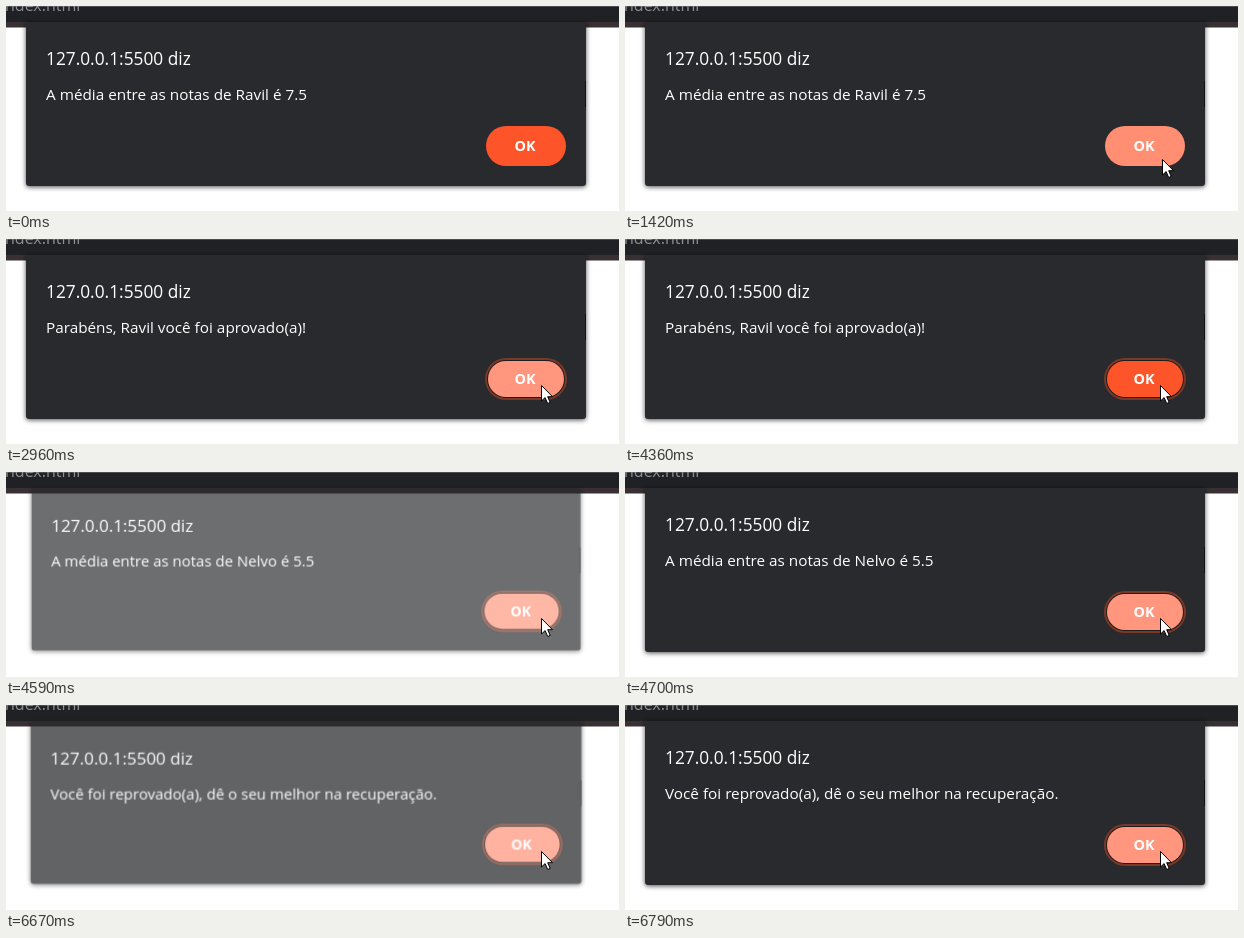
Animation of 613x205 px, one loop 8000 ms. Source, as an HTML page:

```html
<!DOCTYPE html>
<html lang="pt-BR">
<head>
<meta charset="utf-8">
<title>Média das notas</title>
<style>
  html, body { margin: 0; width: 100%; height: 100%; overflow: hidden; background: #fff; }
  svg { display: block; width: 613px; height: 205px; font-family: "Open Sans", "Noto Sans", sans-serif; }

  .panel { fill: #292a2d; filter: drop-shadow(0 1px 2.5px rgba(0, 0, 0, .7)); }
  text { fill: #fff; font-weight: 500; }
  .title { font-size: 17.3px; }
  .msg { font-size: 15.3px; opacity: 0; }
  .ok { font-size: 14.4px; font-weight: 700; text-anchor: middle; }
  .tab { font-size: 16px; font-weight: 400; fill: #8e9094; }

  .dialog { transform-origin: 300px 98px; animation: dialog 8s linear infinite; }
  .msg { animation: 8s step-end infinite; }
  .m1 { animation-name: m1; }
  .m2 { animation-name: m2; }
  .m3 { animation-name: m3; }
  .m4 { animation-name: m4; }
  .ring { opacity: 0; animation: ring 8s step-end infinite; }
  .fill { fill: #fd5529; animation: fill 8s step-end infinite; }
  .cursor { animation: cursor 8s linear infinite; }

  /* each alert shrinks away as the next one grows in */
  @keyframes dialog {
    0%, 34% { opacity: 1; transform: none; }
    34.75% { opacity: .2; transform: scale(.95); animation-timing-function: ease-out; }
    37%, 55.625% { opacity: 1; transform: none; }
    56.375% { opacity: .2; transform: scale(.95); animation-timing-function: ease-out; }
    58.75%, 81.125% { opacity: 1; transform: none; }
    82% { opacity: .2; transform: scale(.95); animation-timing-function: ease-out; }
    84.875%, 100% { opacity: 1; transform: none; }
  }
  @keyframes m1 { 0% { opacity: 1; } 34.75%, 100% { opacity: 0; } }
  @keyframes m2 { 0% { opacity: 0; } 34.75% { opacity: 1; } 56.375%, 100% { opacity: 0; } }
  @keyframes m3 { 0% { opacity: 0; } 56.375% { opacity: 1; } 82%, 100% { opacity: 0; } }
  @keyframes m4 { 0% { opacity: 0; } 82%, 100% { opacity: 1; } }
  @keyframes ring { 0% { opacity: 0; } 34.75%, 100% { opacity: 1; } }

  /* hover, then three presses */
  @keyframes fill {
    0% { fill: #fd5529; }
    15.75% { fill: #fd5529; animation-timing-function: linear; }
    17% { fill: #ff8e73; }
    32.875% { fill: #fd5529; }
    34.75% { fill: #ff967d; }
    54.5% { fill: #fd5529; }
    56.375% { fill: #ff967d; }
    79.875% { fill: #fd5529; }
    82%, 100% { fill: #ff967d; }
  }
  @keyframes cursor {
    0%, 12.49% { opacity: 0; transform: translate(552px, 195px); }
    12.5% { opacity: 1; transform: translate(552px, 195px); }
    15.5% { transform: translate(542px, 163px); }
    17.75% { transform: translate(537px, 153px); }
    19.5%, 21.25% { transform: translate(536px, 150px); }
    24.625%, 100% { opacity: 1; transform: translate(535px, 146px); }
  }
</style>
</head>
<body>
<svg viewBox="0 0 613 205">
  <rect width="613" height="205" fill="#fff"/>
  <rect width="613" height="21.5" fill="#383032"/>
  <rect width="613" height="16" fill="#202124"/>
  <rect width="613" height="1" fill="#4c4d51"/>
  <text class="tab" x="-5" y="5">index.html</text>

  <g class="dialog">
    <path class="panel" d="M20 16H580V177a3 3 0 0 1-3 3H23a3 3 0 0 1-3-3Z"/>
    <rect x="579" y="75" width="1" height="26" fill="#111214"/>
    <text class="title" x="40" y="59">127.0.0.1:5500 diz</text>
    <text class="msg m1" x="40" y="94">A média entre as notas de Ravil é 7.5</text>
    <text class="msg m2" x="40" y="94">Parabéns, Ravil você foi aprovado(a)!</text>
    <text class="msg m3" x="40" y="94">A média entre as notas de Nelvo é 5.5</text>
    <text class="msg m4" x="40" y="94">Você foi reprovado(a), dê o seu melhor na recuperação.</text>
    <rect class="fill" x="480" y="120" width="80" height="40" rx="20"/>
    <g class="ring">
      <rect x="478" y="118" width="84" height="44" rx="22" fill="#292a2d"/>
      <rect x="479" y="119" width="82" height="42" rx="21" fill="#7a3828"/>
      <rect x="481" y="121" width="78" height="38" rx="19" fill="#1f1c1d"/>
      <rect class="fill" x="482" y="122" width="76" height="36" rx="18"/>
    </g>
    <text class="ok" x="519" y="145">OK</text>
  </g>

  <path class="cursor" d="M.5.5V16l3.6-3.4 2.6 5.9 2.5-1.1-2.5-5.7h4.8Z" fill="#fff" stroke="#000" stroke-width="1"/>
</svg>
</body>
</html>
```
